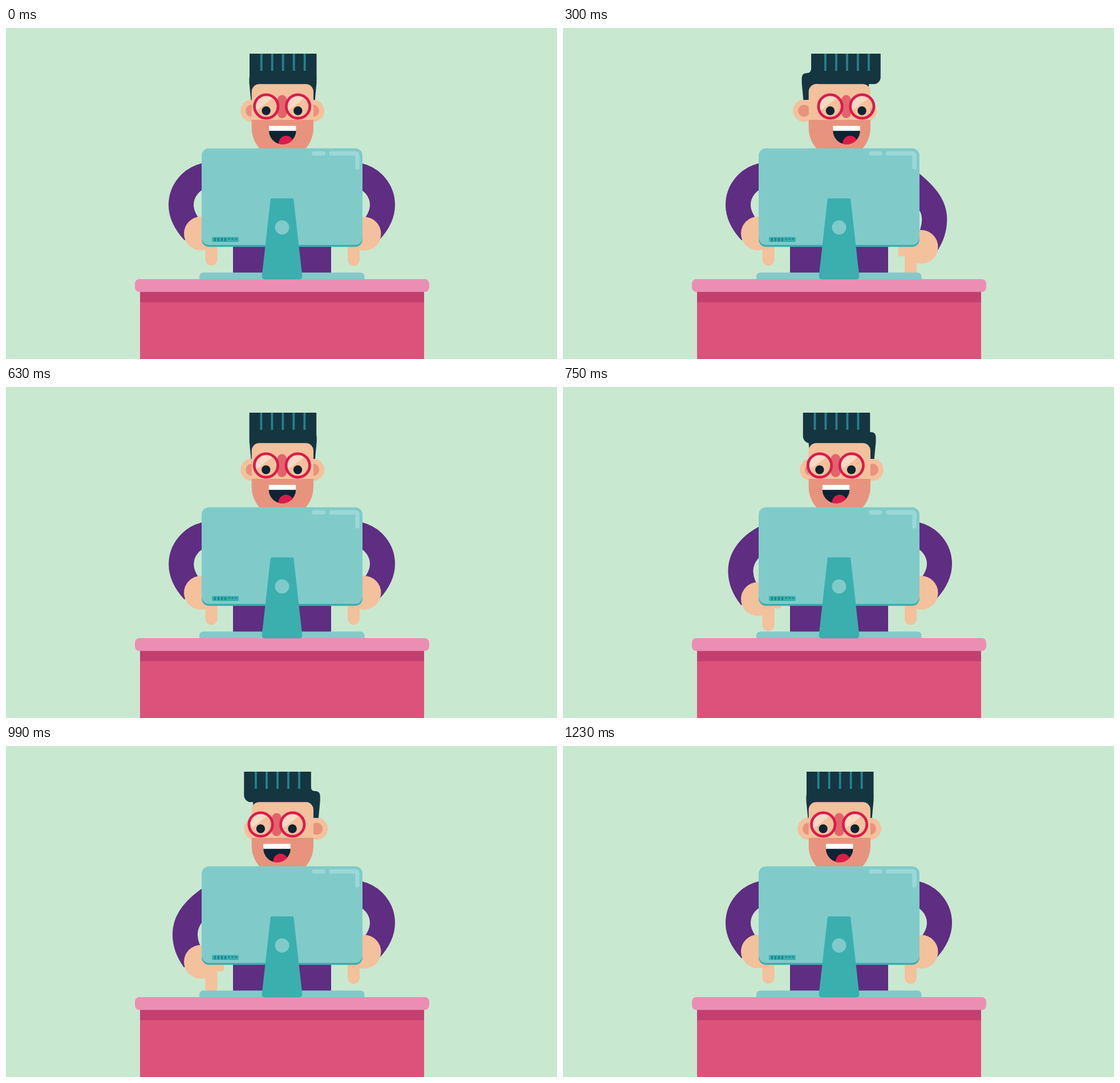
Recreate the animation shown at these times as an HTML page. Size 966 by 580 pixels, loop 1.26 s.

```html
<!DOCTYPE html>
<html lang="en">
<head>
<meta charset="utf-8">
<title>Typing at the desk</title>
<style>
  html, body { margin: 0; width: 100%; height: 100%; overflow: hidden; background: #c9e8d0; }
  svg { display: block; width: 100%; height: 100%; }
  .sleeve { fill: none; stroke: #5f2d81; stroke-width: 44; }
  .skin { fill: #f3c19c; }
  .blush { fill: #e8937d; }
  .hair { fill: #153541; }
  .dark { fill: #0c2434; }
  .teal { fill: #3aafae; }
  .aqua { fill: #80cbca; }
  .shine { fill: none; stroke: #9bd8d7; stroke-width: 7.5; stroke-linecap: round; }
</style>
</head>
<body>
<svg viewBox="0 0 966 580">
  <defs>
    <g id="hand" class="skin">
      <circle cx="341.5" cy="360" r="29.5"/>
      <rect x="349.5" y="350" width="21" height="66.3" rx="10.4"/>
      <rect x="345" y="345" width="37" height="31.5" rx="4"/>
    </g>
    <g id="ear">
      <circle class="skin" r="19.5"/>
      <circle class="blush" r="10.5"/>
    </g>
    <g id="lens">
      <path d="M-18.8 8.2A20.5 20.5 0 0 1 13 -15.9Z" fill="#fff" opacity=".4"/>
      <circle class="dark" cx="-.2" cy="7.5" r="7.7"/>
      <circle r="20.7" fill="none" stroke="#dc1c4b" stroke-width="4.8"/>
    </g>
  </defs>

  <path class="sleeve" id="leftSleeve"/>
  <use href="#hand" id="leftHand"/>
  <g transform="translate(967) scale(-1 1)"><path class="sleeve" id="rightSleeve"/></g>
  <g transform="translate(969.5 .6) scale(-1 1)"><use href="#hand" id="rightHand"/></g>
  <rect x="398" y="300" width="172" height="135" fill="#5f2d81"/>

  <g id="back">
    <use href="#ear" x="430.6" y="145"/>
    <use href="#ear" x="538.4" y="145"/>
    <path class="hair" d="M443 45H528V70Q528 79 535.5 79Q544.5 79 544.5 88V96L541.7 126H429.3L426.5 96V88Q426.5 79 435.5 79Q443 79 443 70Z"/>
  </g>
  <path class="skin" d="M430.7 161V112A14 14 0 0 1 444.7 98H525A14 14 0 0 1 539 112V161Z"/>
  <path class="blush" d="M430.7 161H539V175A54.1 54.1 0 0 1 430.7 175Z"/>

  <g id="front">
    <path class="hair" d="M427 45H544.5V86A12 12 0 0 1 532.5 98.3H439A12 12 0 0 1 427 86Z"/>
    <path d="M447.7 45v30m19 -30v30m19 -30v30m19 -30v30m19 -30v30" stroke="#21838c" stroke-width="3.8"/>
    <rect x="476" y="117.5" width="16.4" height="40.5" rx="8.2" fill="#e2646b"/>
    <use href="#lens" x="456.3" y="137.5"/>
    <use href="#lens" x="512" y="137.5"/>
    <path class="dark" d="M461 179H508.5V180A23.75 23.75 0 0 1 461 180Z"/>
    <path d="M478.1 203A13 13 0 0 1 502.7 196A23.75 23.75 0 0 1 478.1 203Z" fill="#dc1c4b"/>
    <rect x="461" y="171.5" width="47.5" height="8.7" fill="#fff"/>
  </g>

  <rect class="teal" x="343" y="214" width="282" height="169.6" rx="13"/>
  <rect class="aqua" x="343" y="210.8" width="282" height="169.2" rx="13"/>
  <path class="shine" d="M540 219.8H556M570 219.8H612Q616 219.8 616 223.8V244.3"/>
  <rect class="teal" x="361" y="366.3" width="47" height="8.7" rx="2"/>
  <path d="M366.5 368v5.5m6 -5.5v5.5m6 -5.5v5.5m6 -5.5v5.5M391 368.5v2.5m6 -2.5v2.5m6 -2.5v2.5" stroke="#1f838a" stroke-width="3"/>
  <path class="aqua" d="M339 441V436Q339 428.5 346.5 428.5H621Q628.5 428.5 628.5 436V441Z"/>
  <path d="M235 455H733V580H235Z" fill="#dd527a"/>
  <path d="M235 455H733V480.5H235Z" fill="#c43e6e"/>
  <rect x="226" y="440" width="516" height="22.5" rx="8" fill="#ec8eb3"/>
  <path class="teal" d="M466 298.5H502Q504 298.5 504.3 300.5L519.3 434Q519.8 440.4 514 440.4H454Q448.2 440.4 448.7 434L463.7 300.5Q464 298.5 466 298.5Z"/>
  <circle class="aqua" cx="484" cy="349.5" r="12.5"/>
</svg>
<script>
  const LOOP = 1260, PRESS = 600, REACH = 23;
  const el = id => document.getElementById(id);

  // One smooth press and release, starting at the given time.
  const press = (t, start) =>
    t < start || t > start + PRESS ? 0 : (1 - Math.cos(2 * Math.PI * (t - start) / PRESS)) / 2;

  const shift = (id, x, y) => el(id).setAttribute('transform', `translate(${x} ${y})`);

  // Each point is [x, y, x drift, y drift] per pixel of hand travel.
  const sleeve = [
    [377, 251, .2, 0], [348, 258.5, .44, .52], [324.7, 264.3, .55, 1.01], [307, 285, .38, .98],
    [307, 310, .38, 1.09], [307, 328, .38, .98], [316, 343, .2, 1], [329, 357, .05, 1]
  ];

  function moveArm(side, amount) {
    const d = amount * REACH;
    const p = sleeve.map(([x, y, dx, dy]) => `${x + dx * d} ${y + dy * d}`);
    el(side + 'Sleeve').setAttribute('d', `M${p[0]}L${p[1]}C${p.slice(2)}`);
    shift(side + 'Hand', 0, d);
  }

  function draw() {
    const t = performance.now() % LOOP;
    const right = press(t, 0), left = press(t, PRESS), turn = right - left;
    moveArm('right', right);
    moveArm('left', left);
    shift('front', 12.3 * turn, 0);
    shift('back', -7.9 * turn, 0);
    requestAnimationFrame(draw);
  }
  draw();
</script>
</body>
</html>
```
